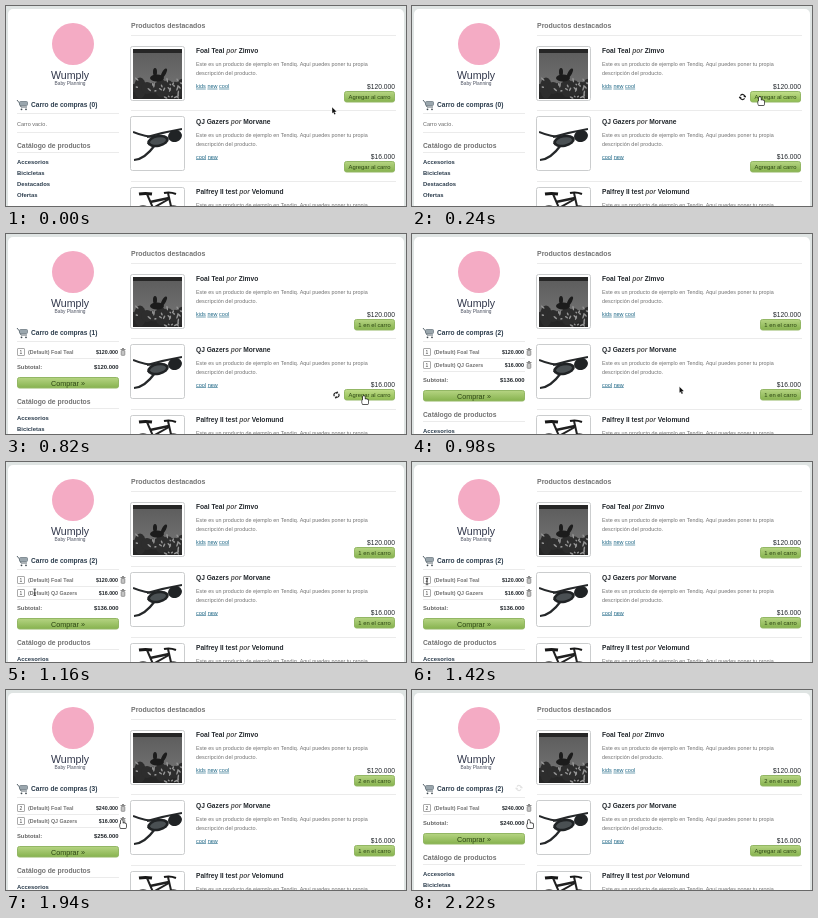
Recreate the animation shown at these times as an HTML page with a canvas. Size 400 px wide and 200 px high, loop 2.24 s.

```html
<!DOCTYPE html>
<html lang="es">
<head>
<meta charset="utf-8">
<title>Carro de compras</title>
<style>
html, body { margin: 0; width: 100%; height: 100%; overflow: hidden; background: #dfe4e3; }
canvas { display: block; width: 400px; height: 200px; }
</style>
</head>
<body>
<canvas id="stage" width="400" height="200"></canvas>
<script>
const ctx = document.getElementById('stage').getContext('2d');
const TAU = Math.PI * 2;
const LOOP = 2240, ADD_FIRST = 440, ADD_SECOND = 960, TYPE_QTY = 1400, UPDATE_QTY = 1540, REMOVE = 2100;
const AJAX = 240;
const INK = '#23282d', NAVY = '#2c3d4d', GREY = '#727272', LINK = '#1d6685', LEAF = '#2b4412';
const ROW = 70.5, SIDE = 11, SIDE_WIDTH = 102, MAIN = 190, RIGHT = 389;

const products = [
  { name: 'Foal Teal', maker: 'Zimvo', tags: ['kids', 'new', 'cool'], price: 120, photo: ponyPhoto },
  { name: 'QJ Gazers', maker: 'Morvane', tags: ['cool', 'new'], price: 16, photo: glassesPhoto },
  { name: 'Palfrey II test', maker: 'Velomund', tags: [], price: 0, photo: bikePhoto }
];

// The pointer rests between moves.
const home = { x: 326, y: 101 };
const moves = [
  { from: 60, to: 180, x: 347, y: 91 },
  { from: 440, to: 680, x: 357, y: 162 },
  { from: 950, to: 1160, x: 29, y: 127 },
  { from: 1160, to: 1270, x: 15, y: 116 },
  { from: 1480, to: 1680, x: 52, y: 136 },
  { from: 1680, to: 1980, x: 116, y: 130 }
];

const money = n => '$' + n + '.000';
const within = (t, from, to) => t >= from && t < to;

function seeded(seed) {
  return () => (seed = seed * 16807 % 2147483647) / 2147483647;
}

function text(str, x, y, size, color = INK, style = '', align = 'left') {
  ctx.font = `${style} ${size}px "Liberation Sans", Arial, sans-serif`;
  ctx.fillStyle = color;
  ctx.textAlign = align;
  ctx.fillText(str, x, y);
  return ctx.measureText(str).width;
}

function paint(fill, stroke, width = 1) {
  if (fill) { ctx.fillStyle = fill; ctx.fill(); }
  if (stroke) { ctx.strokeStyle = stroke; ctx.lineWidth = width; ctx.stroke(); }
}

function box(x, y, w, h, r, fill, stroke, width) {
  ctx.beginPath();
  ctx.roundRect(x, y, w, h, r);
  paint(fill, stroke, width);
}

function blob(x, y, rx, ry, angle, fill, stroke, width) {
  ctx.beginPath();
  ctx.ellipse(x, y, rx, ry, angle, 0, TAU);
  paint(fill, stroke, width);
}

function line(x0, y0, x1, y1, color, width, bend = 0) {
  ctx.beginPath();
  ctx.moveTo(x0, y0);
  ctx.quadraticCurveTo((x0 + x1) / 2, (y0 + y1) / 2 + bend, x1, y1);
  paint(null, color, width);
}

function rule(x, y, w) {
  ctx.fillStyle = '#ebebeb';
  ctx.fillRect(x, Math.round(y), w, 1);
}

function gradient(y, h, top, bottom) {
  const fill = ctx.createLinearGradient(0, y, 0, y + h);
  fill.addColorStop(0, top);
  fill.addColorStop(1, bottom);
  return fill;
}

function button(label, x, y, w, size, hover) {
  const fill = hover ? gradient(y, 11, '#c3df8c', '#8fbc52') : gradient(y, 11, '#b8d685', '#86b24e');
  box(x + .5, y + .5, w - 1, 10.5, 2, fill, '#93b765');
  text(label, x + w / 2, y + 6 + size * .36, size, LEAF, '', 'center');
}

// Photos are drawn in a 49 by 50 area.
function ponyPhoto() {
  const random = seeded(7);
  ctx.fillStyle = gradient(0, 50, '#5c5c5c', '#777');
  ctx.fillRect(0, 0, 49, 50);
  ctx.fillStyle = '#262626';
  ctx.fillRect(0, 0, 49, 4);
  ctx.fillRect(0, 38, 49, 12);
  for (let x = 0; x < 50; x += 7) blob(x, 39, 6, 4 + random() * 7, 0, '#2d2d2d');
  for (let i = 0; i < 26; i++) {
    blob(random() * 49, 30 + random() * 20, 1 + random() * 2, .8, random() * 3, '#959595');
  }
  blob(24, 29, 7, 3.5, 0, '#1c1c1c');
  blob(31, 24, 2, 5, .5, '#1c1c1c');
  blob(22, 23, 2, 4, 0, '#1c1c1c');
}

function glassesPhoto() {
  line(0, 13, 26, 18, '#25282a', 2, 3);
  line(1, 41, 22, 26, '#25282a', 2.2, 7);
  line(14, 18, 49, 10, '#25282a', 2, -1);
  blob(25, 22, 11, 6, -.2, '#202325');
  blob(42, 17, 7, 6, -.3, '#202325');
  blob(25, 22, 8, 3.5, -.2, '#4a5053');
}

function bikePhoto() {
  const wheel = x => blob(x, 25, 9, 9, 0, null, '#333', 1.5);
  wheel(10);
  wheel(40);
  line(6, 4, 19, 4, '#171717', 3, -1);
  line(14, 4, 20, 18, '#202020', 2);
  line(17, 12, 36, 8, '#202020', 2.5);
  line(20, 18, 36, 9, '#202020', 2);
  line(35, 3, 40, 25, '#202020', 2);
  line(31, 3, 43, 4, '#171717', 2, -2);
}

function thumbnail(photo, y) {
  box(124.5, y + 40.5, 54, 54, 2, '#fff', '#cbcdce');
  ctx.save();
  ctx.translate(127, y + 43);
  ctx.beginPath();
  ctx.rect(0, 0, 49, 50);
  ctx.clip();
  photo();
  ctx.restore();
}

function product(item, index, inCart, hover) {
  const y = index * ROW, top = Math.floor(y);
  thumbnail(item.photo, top);
  let x = MAIN;
  x += text(item.name + ' ', x, 47 + y, 6.65, INK, 'bold');
  x += text('por ', x, 47 + y, 6.65, '#555', 'italic bold');
  text(item.maker, x, 47 + y, 6.65, INK, 'bold');
  text('Este es un producto de ejemplo en Tendiq. Aquí puedes poner tu propia', MAIN, 60 + y, 5.4, GREY);
  text('descripción del producto.', MAIN, 69 + y, 5.5, GREY);
  rule(125, 104 + y, 265);
  if (!item.price) return;
  x = MAIN;
  for (const tag of item.tags) {
    const w = text(tag, x, 82 + y, 5.5, LINK);
    ctx.fillRect(x, 82.7 + y, w, .6);
    x += w + 1.6;
  }
  text(money(item.price), RIGHT, 82.5 + y, 6.7, INK, '', 'right');
  const width = buttonWidth(inCart);
  button(inCart ? inCart + ' en el carro' : 'Agregar al carro', RIGHT - width, 85 + top, width, 5.85, hover);
}

function buttonWidth(inCart) {
  return inCart ? 41 : 51;
}

function cartIcon() {
  line(11, 94, 15, 101, '#5a666e', 1, -2);
  line(15, 101, 21, 101, '#5a666e', 1);
  box(13.5, 95.5, 8, 4, 1, '#9aa6ad', '#66737b', .7);
  for (const x of [15.5, 20]) blob(x, 103.3, .9, .9, 0, '#3e484e');
}

function trash(y) {
  ctx.fillStyle = '#8b8b8b';
  ctx.fillRect(114.5, y - 3, 5, 1);
  ctx.fillRect(116, y - 4, 2, 1);
  box(115.2, y - 1.5, 3.6, 4.8, .5, '#c4c4c4', '#858585', .8);
}

function cartRow({ name, price }, qty, shownQty, y) {
  box(SIDE + .5, y - 5.5, 7, 7, .5, '#fff', '#aaa');
  text(shownQty, SIDE + 4, y - .1, 5, '#444', '', 'center');
  text('(Default) ' + name, 22, y, 5.3, GREY, 'bold');
  text(money(qty * price), 112, y, 5.3, INK, 'bold', 'right');
  trash(y - 2);
  rule(SIDE, y + 4, SIDE_WIDTH);
}

function sidebar(t, quantities) {
  blob(67, 38, 21, 21, 0, '#f4abc4');
  text('Wumply', 64, 72.5, 10.6, '#30364a', '', 'center');
  text('Baby Planning', 64, 79, 4.8, '#4b5060', '', 'center');

  cartIcon();
  const count = quantities[0] + quantities[1];
  text(`Carro de compras (${count})`, 25, 101.3, 6.6, NAVY, 'bold');
  rule(SIDE, 107, SIDE_WIDTH);

  let y = 120;
  if (!count) {
    text('Carro vacío.', SIDE, y, 5.5, '#666');
    rule(SIDE, 126, SIDE_WIDTH);
    y += 22;
  } else {
    let total = 0;
    quantities.forEach((qty, i) => {
      if (!qty) return;
      total += qty * products[i].price;
      cartRow(products[i], qty, i === 0 && t >= TYPE_QTY ? 2 : qty, y);
      y += 13;
    });
    y += 2.3;
    text('Subtotal:', SIDE, y, 5.8, '#666', 'bold');
    text(money(total), 112.5, y, 5.9, INK, 'bold', 'right');
    button('Comprar »', SIDE, Math.round(y + 7.7), SIDE_WIDTH, 7.2);
    y += 34.5;
  }
  text('Catálogo de productos', SIDE, y, 6.75, GREY, 'bold');
  rule(SIDE, y + 4, SIDE_WIDTH);
  ['Accesorios', 'Bicicletas', 'Destacados', 'Ofertas'].forEach((label, i) =>
    text(label, SIDE, y + 15.7 + i * 11.2, 5.9, NAVY, 'bold'));
}

function spinner(x, y, t, color = '#222') {
  ctx.save();
  ctx.translate(x, y);
  ctx.rotate(t / 70);
  for (let i = 0; i < 2; i++) {
    ctx.beginPath();
    ctx.arc(0, 0, 2.5, .3, 2.5);
    paint(null, color, 1.1);
    line(-3.2, 1.3, -1, 1.1, color, 1.4);
    ctx.rotate(Math.PI);
  }
  ctx.restore();
}

function pointerAt(t) {
  return moves.reduce((at, move) => {
    const p = Math.min(1, Math.max(0, (t - move.from) / (move.to - move.from)));
    const eased = 1 - (1 - p) ** 2;
    return { x: at.x + (move.x - at.x) * eased, y: at.y + (move.y - at.y) * eased };
  }, home);
}

const cursors = {
  hand() {
    const parts = (fill, stroke) => {
      box(-.8, 3.2, 6, 5, 1.5, fill, stroke, 1.4);
      box(0, 0, 1.8, 6, .9, fill, stroke, 1.4);
    };
    parts(null, '#222');
    parts('#fff');
  },
  beam() {
    line(0, .5, 0, 6.5, '#222', .8);
    for (const y of [.3, 6.7]) line(-1.3, y, 1.3, y, '#222', .7);
  },
  arrow() {
    line(1.5, 4, 3, 7.2, '#111', 1.3);
    ctx.beginPath();
    ctx.moveTo(0, 0);
    ctx.lineTo(0, 6.3);
    ctx.lineTo(4.6, 4.6);
    ctx.closePath();
    paint('#111', '#fff', .4);
  }
};

function pointer({ x, y }, kind) {
  ctx.save();
  ctx.translate(x, y);
  cursors[kind]();
  ctx.restore();
}

function draw(t) {
  const quantities = [
    t < ADD_FIRST ? 0 : t < UPDATE_QTY ? 1 : 2,
    within(t, ADD_SECOND, REMOVE) ? 1 : 0,
    0
  ];
  const at = pointerAt(t);
  const hovers = products.map((item, i) => {
    const top = 85 + Math.floor(i * ROW);
    return item.price > 0 && within(at.x, RIGHT - buttonWidth(quantities[i]), RIGHT) && within(at.y, top, top + 11);
  });

  ctx.fillStyle = '#dfe4e3';
  ctx.fillRect(0, 0, 400, 200);
  box(2, 3, 396, 210, 5, '#fff');
  sidebar(t, quantities);
  text('Productos destacados', 125, 22, 6.95, GREY, 'bold');
  rule(125, 29, 265);
  products.forEach((item, i) => product(item, i, quantities[i], hovers[i]));

  [ADD_FIRST, ADD_SECOND].forEach((done, i) => {
    if (within(t, done - AJAX, done)) spinner(330.5, 91 + i * 70, t);
  });
  if (within(t, UPDATE_QTY, UPDATE_QTY + AJAX) || t >= REMOVE) spinner(107, 98, t, '#e2e2e2');

  const onTrash = within(at.x, 113, 121) && within(at.y, 125, 135);
  const onText = within(t, 1120, UPDATE_QTY);
  pointer(at, hovers.includes(true) || onTrash ? 'hand' : onText ? 'beam' : 'arrow');
}

const start = performance.now();
function frame() {
  draw((performance.now() - start) % LOOP);
  requestAnimationFrame(frame);
}
frame();
</script>
</body>
</html>
```
